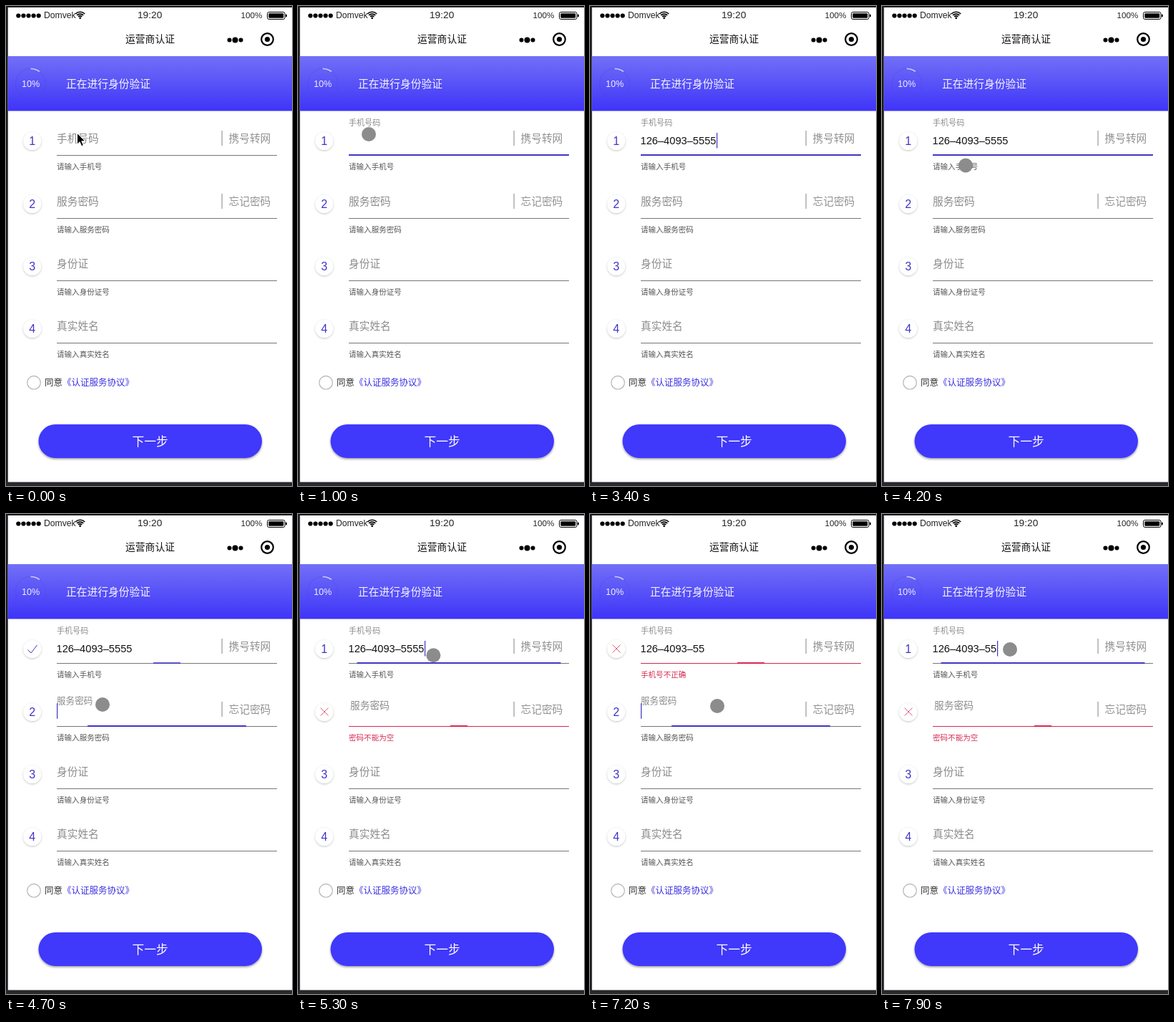
An HTML page for the animation above (8000 ms loop, 400x670 px).

```html
<!DOCTYPE html>
<html lang="zh-CN">
<head>
<meta charset="utf-8">
<title>运营商认证</title>
<style>
  html, body { margin: 0; width: 100%; height: 100%; overflow: hidden; background: #fff; }
  svg { display: block; width: 400px; height: 670px; }
  text { font-family: "Liberation Sans", "Noto Sans CJK SC", "Noto Sans CJK", sans-serif; }
  .cjk { font-family: "Noto Sans CJK SC", "Noto Sans CJK", sans-serif; font-weight: 300; }
</style>
</head>
<body>
<svg id="stage" viewBox="0 0 400 670" xmlns="http://www.w3.org/2000/svg">
  <defs>
    <linearGradient id="banner" x1="0" y1="0" x2="0" y2="1">
      <stop offset="0" stop-color="#7270f7"/>
      <stop offset="1" stop-color="#3e34f8"/>
    </linearGradient>
    <filter id="soft" x="-40%" y="-40%" width="180%" height="180%">
      <feDropShadow dx="0" dy="1" stdDeviation="1.6" flood-color="#000" flood-opacity=".25"/>
    </filter>
    <filter id="lift" x="-5%" y="-20%" width="110%" height="150%">
      <feDropShadow dx="0" dy="1.5" stdDeviation="1.5" flood-color="#000" flood-opacity=".4"/>
    </filter>
  </defs>
</svg>
<script>
const LOOP = 8000, STEP = 100, PITCH = 87.33;
const LEFT = 71, WIDTH = 308;
const PURPLE = '#4034c6', RED = '#d62850', GREY = '#8c8c8c';
const NUMBER = '126–4093–5555', DIGIT = 14.66 * 0.5562;

const stage = document.getElementById('stage');

function add(tag, attrs, parent = stage) {
  const node = document.createElementNS('http://www.w3.org/2000/svg', tag);
  set(node, attrs);
  parent.append(node);
  return node;
}
function set(node, attrs) {
  for (const key in attrs) node.setAttribute(key, attrs[key]);
}
const isCjk = s => /[\u3000-\u9fff]/.test(s);
// Places text by the vertical centre of its glyphs.
function label(str, x, y, size, fill, parent = stage, extra = {}) {
  const cjk = isCjk(str);
  const node = add('text', {
    x, y: y + size * (cjk ? 0.38 : 0.36), 'font-size': size, fill,
    ...(cjk ? { class: 'cjk' } : {}), ...extra
  }, parent);
  node.textContent = str;
  return node;
}
const rect = (x, y, width, height, fill, parent, extra) =>
  add('rect', { x, y, width, height, fill, ...extra }, parent);
const dot = (cx, cy, r, fill, parent, extra) =>
  add('circle', { cx, cy, r, fill, ...extra }, parent);
const show = (node, on) => node.setAttribute('visibility', on ? 'visible' : 'hidden');
// Rows sit on whole pixels so that their hairlines stay sharp.
const rowTop = index => Math.ceil(index * PITCH);

function drawFrame() {
  rect(0, 0, 400, 670, '#fff');
  rect(0, 0, 400, 2, '#1c1a1e');
  rect(0, 0, 2.7, 670, '#1c1a1e');
  rect(0, 664.5, 400, 5.5, '#29282c');
}

function drawStatusBar() {
  for (let i = 0; i < 5; i++) dot(17.3 + i * 7.1, 13.5, 3.1, '#000');
  label('Domvek', 53, 12.7, 12.2, '#222');
  for (const r of [3.6, 6.3, 9]) {
    const d = r * 0.72;
    add('path', {
      d: `M${103.7 - d} ${17.5 - d}A${r} ${r} 0 0 1 ${103.7 + d} ${17.5 - d}`,
      fill: 'none', stroke: '#000', 'stroke-width': 1.7
    });
  }
  dot(103.7, 16.8, 1.4, '#000');
  label('19:20', 184, 12.3, 13.7, '#222');
  label('100%', 328.5, 13, 11.7, '#222');
  rect(365.5, 8.5, 24.5, 10, 'none', stage, { rx: 2.2, stroke: '#000' });
  rect(367.3, 10.3, 20.9, 6.4, '#000', stage, { rx: 1 });
  rect(391, 11.5, 1.8, 4, '#000', stage, { rx: 0.9 });
}

function drawHeader() {
  label('运营商认证', 167, 46, 13.8, '#111', stage, { style: 'font-weight:400' });
  dot(312.5, 47.5, 3, '#000');
  dot(320.5, 47.5, 4, '#000');
  dot(328.5, 47.5, 3, '#000');
  dot(365.5, 46.5, 8.3, 'none', stage, { stroke: '#000', 'stroke-width': 2.2 });
  dot(365.5, 46.5, 3.6, '#000');

  rect(2.7, 70, 397.3, 76.5, 'url(#banner)');
  dot(34.5, 108.5, 21, 'none', stage, { stroke: '#4a42dc', 'stroke-opacity': 0.35 });
  add('path', {
    d: 'M34.5 87.5A21 21 0 0 1 46.8 91.5',
    fill: 'none', stroke: '#c9c8f6', 'stroke-width': 1.6
  });
  label('10%', 22, 108.7, 12.6, '#eeeeff');
  label('正在进行身份验证', 84, 108, 14.75, '#f6f5ff');
}

function drawFooter() {
  dot(39, 525.7, 9.3, '#fff', stage, { stroke: '#b4b4b4', 'stroke-width': 1.2 });
  label('同意', 54, 525.5, 12.5, '#333');
  label('《认证服务协议》', 79, 525.5, 12.5, '#3a2fe0');
  rect(45.5, 584, 312.5, 47, '#3f38fb', stage, { rx: 23.5, filter: 'url(#lift)' });
  label('下一步', 176.5, 607.7, 16.8, '#fff');
}

function makeRow(index, name, hint, side, error) {
  const g = add('g', { transform: `translate(0 ${rowTop(index)})` });
  dot(36.7, 188.5, 12.4, '#fff', g, { filter: 'url(#soft)' });
  const digit = label(String(index + 1), 36.7, 188, 16, PURPLE, g, { 'text-anchor': 'middle' });
  const mark = (d, stroke) => add('path', { d, stroke, fill: 'none', visibility: 'hidden' }, g);
  const row = {
    digit,
    check: mark('M30.5 189.5L35 194L43.5 183', PURPLE),
    cross: mark('M31.5 182.5L42.5 193.5M42.5 182.5L31.5 193.5', '#dc5f7d'),
    name: label(name, LEFT, 184.5, 14.7, GREY, g),
    base: rect(LEFT, 208, WIDTH, 1, '#777', g),
    ripple: rect(LEFT, 207, 0, 2, PURPLE, g),
    hint: label(hint, LEFT, 224.2, 10.55, '#555', g),
    hintText: hint, error
  };
  if (side) {
    rect(301.5, 174, 1.2, 21, '#999', g);
    label(side, 311.5, 184.5, 14.7, '#929292', g);
  }
  return row;
}

drawFrame();
drawStatusBar();
drawHeader();
const rows = [
  ['手机号码', '请输入手机号', '携号转网', '手机号不正确'],
  ['服务密码', '请输入服务密码', '忘记密码', '密码不能为空'],
  ['身份证', '请输入身份证号'],
  ['真实姓名', '请输入真实姓名']
].map((args, i) => makeRow(i, ...args));
drawFooter();

const value = label('0', 70.5, 187.7, 14.66, '#111');
const caret = rect(0, 0, 1.2, 21.5, PURPLE);
const touch = dot(0, 0, 10, GREY);
const arrow = add('path', {
  d: 'M99.5 177.5v15.6l3.6-3.4 2.6 5.9 2.7-1.1-2.6-5.8h5z',
  fill: '#000', stroke: '#fff', 'stroke-width': 1
});

// [time, row]: the field that takes the focus
const focuses = [[480, 0], [4620, 1], [5167, 0], [7120, 1], [7767, 0]];
// [time, characters in the phone field]
const keys = [[0, 0], [1200, 1], [1400, 2], [1600, 4], [1900, 5], [2100, 6], [2300, 7], [2400, 9],
  [2800, 10], [3200, 11], [3300, 12], [3400, 13], [5800, 12], [6000, 11]];
// [time, x, y]
const path = [[400, 99, 179], [3900, 99, 179], [4500, 135, 266], [4750, 135, 266], [5150, 189.4, 197.2],
  [6400, 189.4, 197.2], [6500, 227, 230], [7000, 178, 268], [7300, 178, 268], [7700, 179, 189], [LOOP, 179, 189]];
const shown = [[400, 1200], [3900, 5800], [6500, LOOP]];

const grow = [[0, 0], [80, 0.72], [133, 0.925], [230, 1]];
const shrink = [[0, 1], [80, 0.123], [133, 0.078], [230, 0]];
const float = [[0, 0], [80, 0.58], [133, 0.74], [230, 1]];

const smooth = u => u * u * (3 - 2 * u);
function track(points, t, col = 1, ease = u => u) {
  const i = points.findIndex(p => p[0] > t);
  if (i === 0) return points[0][col];
  if (i < 0) return points[points.length - 1][col];
  const a = points[i - 1], b = points[i];
  return a[col] + (b[col] - a[col]) * ease((t - a[0]) / (b[0] - a[0]));
}
const lastOf = (list, t) => list.filter(item => item[0] <= t).pop();

function renderRow(row, index, t, typed) {
  const current = lastOf(focuses, t);
  const mine = lastOf(focuses.filter(f => f[1] === index), t);
  const focused = !!mine && mine === current;
  const visited = !!mine && !focused;
  const valid = index === 0 && typed === NUMBER.length;
  const bad = visited && !valid;
  const age = current ? t - current[0] : 0;

  show(row.digit, !visited);
  show(row.check, visited && valid);
  show(row.cross, bad);
  row.hint.textContent = bad ? row.error : row.hintText;
  set(row.hint, { fill: bad ? RED : '#555', style: `font-weight:${bad ? 400 : 300}` });
  row.base.setAttribute('fill', bad ? RED : '#777');

  const span = focused ? track(grow, age) : visited ? track(shrink, age) : 0;
  set(row.ripple, {
    x: LEFT + WIDTH * (1 - span) / 2, width: WIDTH * span,
    fill: bad ? RED : PURPLE, opacity: visited && valid ? 0.8 : 1
  });

  let up = 0;
  if (index === 0 && typed) up = 1;
  else if (focused) up = track(float, age);
  else if (visited) up = 1 - track(float, age);
  const size = 14.7 - 3.65 * up;
  set(row.name, {
    x: LEFT + (visited ? 11 * up * (1 - up) : 0),
    y: 184.5 - 21.7 * up + size * 0.38,
    'font-size': size
  });
}

function render(t) {
  const key = lastOf(keys, t), typed = key[1];
  const focus = lastOf(focuses, t);
  rows.forEach((row, i) => renderRow(row, i, t, typed));
  value.textContent = NUMBER.slice(0, typed);

  if (focus) {
    const since = t - Math.max(focus[0], key[0]);
    show(caret, Math.floor(since / 500) % 2 === 0);
    set(caret, {
      x: focus[1] ? LEFT : Math.ceil(70.5 + typed * DIGIT),
      y: 177 + focus[1] * PITCH
    });
  } else show(caret, false);

  show(arrow, t < 400);
  show(touch, shown.some(([from, to]) => t >= from && t < to));
  set(touch, { cx: track(path, t, 1, smooth), cy: track(path, t, 2, smooth) });
}

const start = performance.now();
function tick() {
  const t = (performance.now() - start) % LOOP;
  render(Math.floor(t / STEP) * STEP);
  requestAnimationFrame(tick);
}
tick();
</script>
</body>
</html>
```
